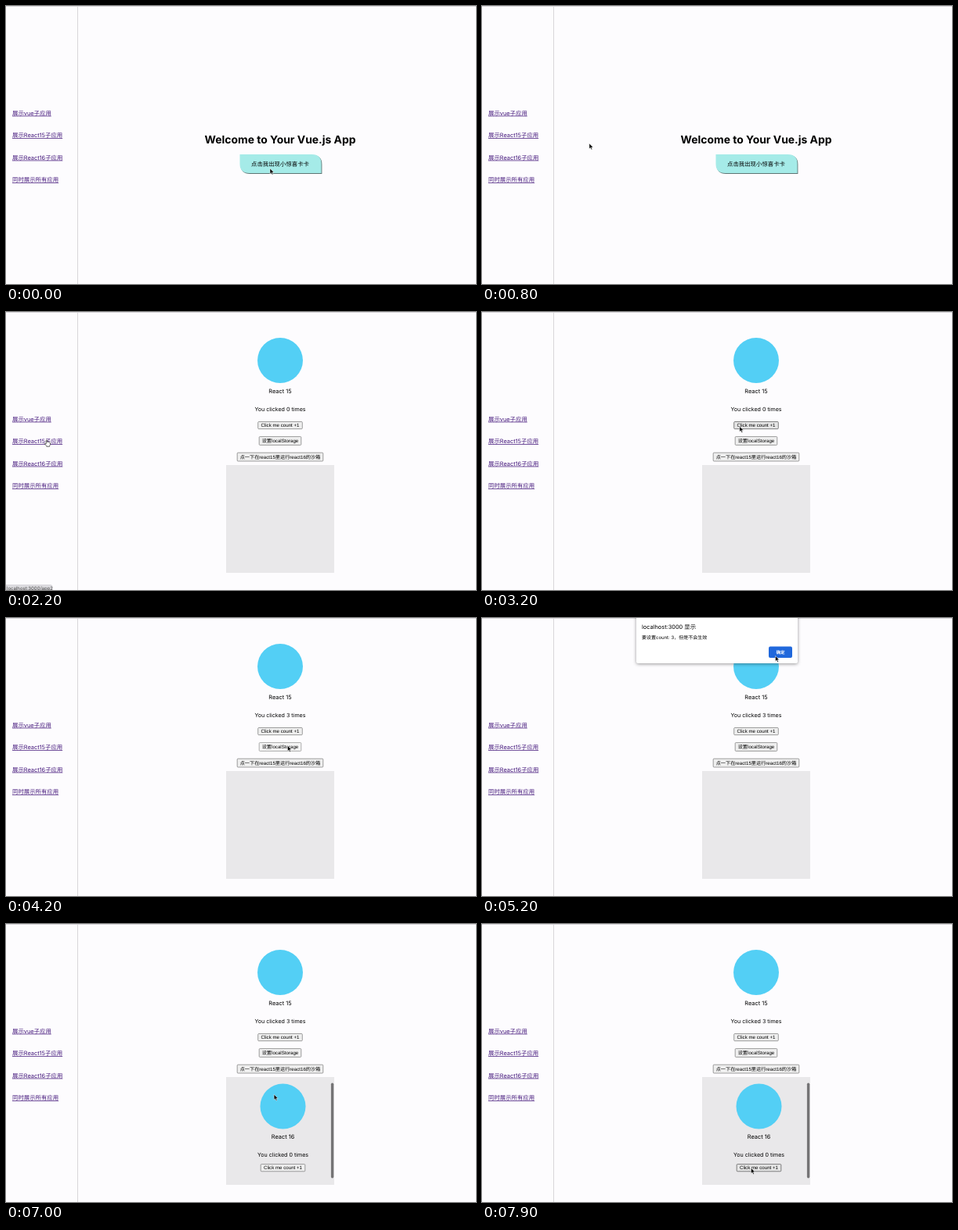
An HTML page that plays this animation: 600x356 px, repeating every 8 s.

```html
<!DOCTYPE html>
<html lang="zh-CN">
<head>
<meta charset="utf-8">
<title>Micro frontends</title>
<style>
  html, body { margin: 0; width: 100%; height: 100%; overflow: hidden; background: #fdfcfe; }
  svg { display: block; width: 600px; height: 356px; }
  text { font: 7.4px Inter, "Noto Sans CJK SC", "Noto Sans CJK", sans-serif; fill: #000; text-rendering: geometricPrecision; }
  .mid { text-anchor: middle; }
  .link { fill: #45187c; text-decoration: underline; }
  .title { font-size: 13.9px; font-weight: 700; }
  .count { font-size: 7.1px; }
  .btn text { font: 6.17px "Liberation Sans", "Noto Sans CJK SC", "Noto Sans CJK", sans-serif; text-anchor: middle; }
  .btn rect { fill: #efefef; stroke: #767676; stroke-width: .7; }
  .btn.hover rect { fill: #e5e5e5; stroke: #4f4f4f; }
  .btn.down rect { fill: #f5f5f5; stroke: #8d8d8d; }
  .msg { font-size: 6px; }
  .ok { font-size: 5.6px; font-weight: 700; fill: #fff; }
  .status { font-size: 6px; fill: #444; }
  .panel { filter: drop-shadow(0 1px 2px rgba(0, 0, 0, .4)); }
</style>
</head>
<body>
<svg viewBox="0 0 600 356">
  <rect width="600" height="356" fill="#fdfcfe"/>
  <path d="M0 .5H600M91.5 0V356" stroke="#d8d6da" fill="none"/>
  <g id="links"></g>

  <g id="vue">
    <text class="title mid" x="350" y="176">Welcome to Your Vue.js App</text>
    <path d="M299 190.5H391Q403 190.5 403 202.5V214.5H311Q299 214.5 299 202.5Z" fill="#5d7473" transform="translate(.4 .6)"/>
    <path d="M298.5 190H390.5Q402.5 190 402.5 202V214H310.5Q298.5 214 298.5 202Z" fill="#a5ebe8"/>
    <text class="mid" x="350" y="204.8">点击我出现小惊喜卡卡</text>
  </g>

  <g id="react">
    <circle cx="350" cy="62" r="29" fill="#53cff5"/>
    <text class="mid" x="350" y="103.8">React 15</text>
    <text class="count mid" id="count" x="350" y="127"></text>
    <g id="buttons"></g>
    <rect x="281" y="196" width="138" height="138" fill="#e9e8ea"/>
    <g id="inner">
      <circle cx="353.5" cy="233.5" r="29" fill="#53cff5"/>
      <text class="mid" x="353.5" y="275.3">React 16</text>
      <text class="count mid" x="353.5" y="298.4">You clicked 0 times</text>
      <g id="innerButtons"></g>
      <rect x="414.9" y="203.5" width="3.4" height="122" rx="1.7" fill="#757476"/>
    </g>
  </g>

  <g id="dialog">
    <path class="panel" d="M197 -6H403V55.5Q403 58 400.5 58H199.5Q197 58 197 55.5Z" fill="#fff"/>
    <text x="204" y="13.6">localhost:3000 显示</text>
    <text class="msg" x="204" y="26.6">要设置count: 3，但是不会生效</text>
    <rect x="366" y="36.5" width="30" height="14.5" rx="2" fill="#2068dc"/>
    <text class="ok mid" x="381" y="46">确定</text>
  </g>

  <g id="status">
    <path d="M0 349.5H57Q59 349.5 59 351.5V356H0Z" fill="#dcdbdf" stroke="#c4c3c8" stroke-width=".5"/>
    <text class="status" x="1" y="356.2">localhost:3000/app2</text>
  </g>

  <g id="cursor">
    <path id="arrow" d="M0 0V6.9L1.6 5.5L2.7 8L3.9 7.5L2.8 5.1H5Z" fill="#000" stroke="#fff" stroke-width=".5"/>
    <path id="hand" d="M-.7 .3Q0 -.7 .7 .3V2.5Q1.5 2 2 2.7Q2.8 2.3 3.3 3Q4.4 2.7 4.5 3.7V5.3Q4.3 6.5 3.7 7.3V8.2H-.3V7.4Q-1.6 6.2 -2.6 4.6Q-2.2 3.5 -.7 4.7Z" fill="#fff" stroke="#222" stroke-width=".7"/>
  </g>
</svg>
<script>
const LOOP = 8000, STEP = 100;
const $ = id => document.getElementById(id);

function add(parent, tag, attrs, label) {
  const el = document.createElementNS("http://www.w3.org/2000/svg", tag);
  for (const key in attrs) el.setAttribute(key, attrs[key]);
  if (label) el.textContent = label;
  return parent.appendChild(el);
}

function button(parent, cx, cy, w, h, label) {
  const g = add(parent, "g", { class: "btn" });
  add(g, "rect", { x: cx - w / 2, y: cy - h / 2, width: w, height: h, rx: 1 });
  add(g, "text", { x: cx, y: cy + 2.2 }, label);
  return { g, hit: (x, y) => Math.abs(x - cx) < w / 2 && Math.abs(y - cy) < h / 2 + 1 };
}

["展示vue子应用", "展示React15子应用", "展示React16子应用", "同时展示所有应用"]
  .forEach((label, i) => add($("links"), "text", { class: "link", x: 8, y: 139.6 + i * 28.5 }, label));

const outer = [
  button($("buttons"), 350, 145.1, 56.6, 9.2, "Click me count +1"),
  button($("buttons"), 350, 165, 53.6, 10.8, "设置localStorage"),
  button($("buttons"), 350, 185.6, 109.6, 10.8, "点一下在react15里运行react16的沙箱")
];
const inner = button($("innerButtons"), 353.5, 312.2, 56.6, 9.2, "Click me count +1");

// time, x, y of the pointer tip
const path = [
  [0, 337, 208], [300, 150, 178], [600, 150, 178], [1400, 66, 165],
  [1600, 66, 165], [2200, 52, 164], [2700, 52, 164], [3300, 351, 145],
  [3900, 351, 145], [4200, 359.5, 163.5], [4900, 359.5, 163.5], [5200, 374.5, 48.5],
  [5500, 374.5, 48.5], [6100, 338.5, 179.5], [6700, 338.5, 179.5],
  [7500, 350, 302], [7900, 343.5, 312.5], [LOOP, 343.5, 312.5]
];
const clicks = [3400, 3600, 3800];
const presses = [...clicks, 4200, 6400];

function pointer(t) {
  const i = path.findIndex(p => p[0] > t);
  const [t0, x0, y0] = path[i - 1], [t1, x1, y1] = path[i];
  const k = (t - t0) / (t1 - t0), e = k * k * (3 - 2 * k);
  return [x0 + (x1 - x0) * e, y0 + (y1 - y0) * e];
}

const show = (id, on) => $(id).style.display = on ? "" : "none";
const within = (t, a, b) => t >= a && t < b;

function draw(t) {
  const [x, y] = pointer(t);
  const modal = within(t, 4400, 5400), react = t >= 1900;
  const onLink = x > 8 && x < 72 && Math.abs((y - 137 + 14.3) % 28.6 - 14.3) < 5;

  show("vue", !react);
  show("react", react);
  show("inner", t >= 6900);
  show("dialog", modal);
  show("status", within(t, 1900, 2800));
  show("hand", onLink);
  show("arrow", !onLink);

  $("count").textContent = `You clicked ${clicks.filter(c => c <= t).length} times`;
  $("cursor").setAttribute("transform", `translate(${x} ${y})`);

  const down = presses.some(p => within(t, p, p + STEP));
  for (const b of [...outer, inner]) {
    const over = !modal && b.hit(x, y);
    b.g.classList.toggle("hover", over);
    b.g.classList.toggle("down", over && down);
  }
}

function tick() {
  draw(Math.floor(performance.now() % LOOP / STEP) * STEP);
  requestAnimationFrame(tick);
}
tick();
</script>
</body>
</html>
```
